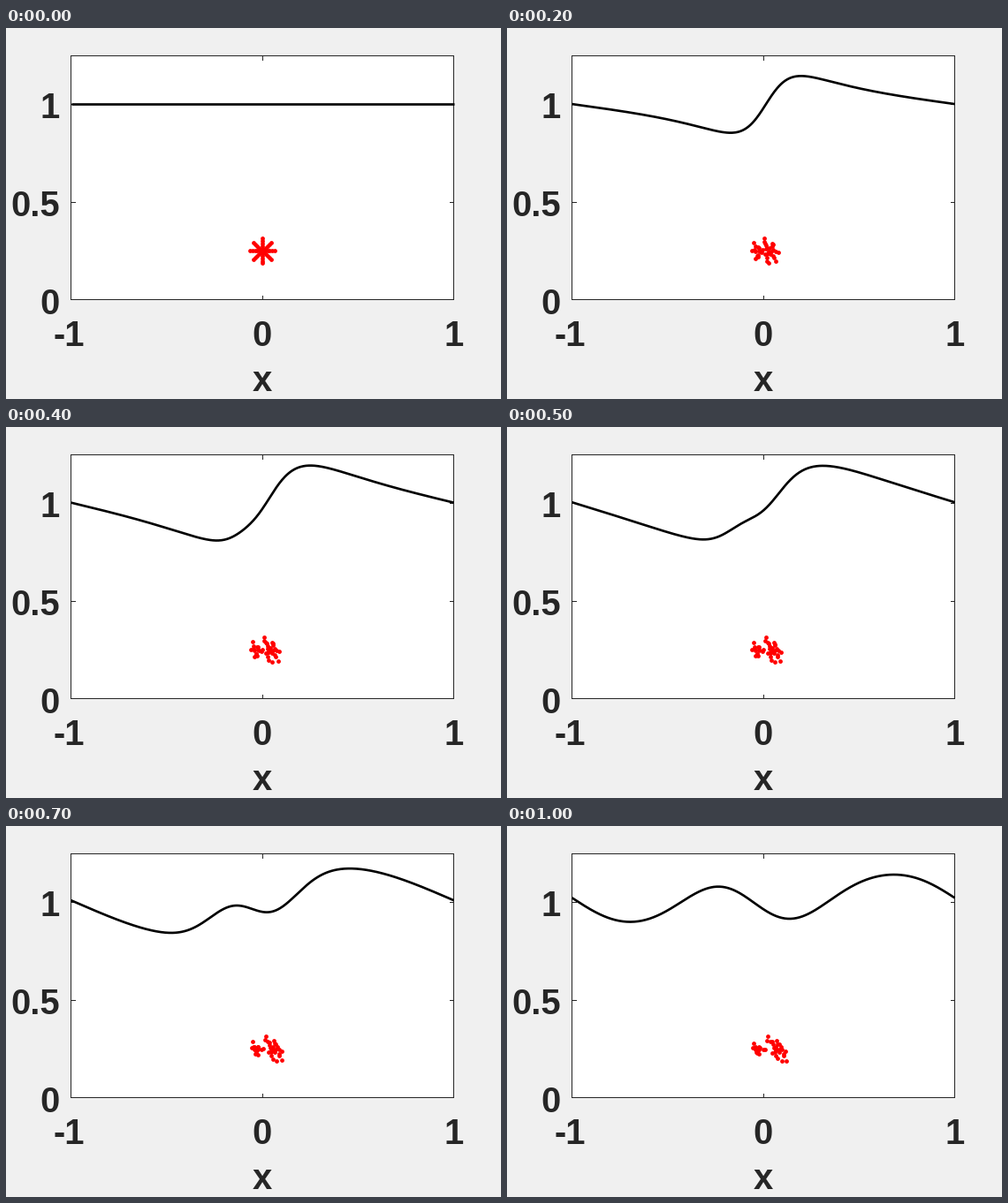
Recreate the animation shown at these times as a matplotlib script. Size 560x420 px, loop 1100 ms.

```python
import numpy as np
import matplotlib.pyplot as plt
from matplotlib.animation import FuncAnimation

W, H, DPI = 560, 420, 100
FRAMES, STEP = 11, 100
PX = 72 / DPI
INK = "#262626"
LEFT, RIGHT, TOP, BOTTOM = 73, 506, 31, 307
MID, HALF = 290, 216.5            # x = 0 and one unit of x, in pixels
LEVEL, UNIT = 86, 220.8           # y = 1 and one unit of y, in pixels
SPOKES, PER_SPOKE, REACH = 8, 5, 14


def smoothstep(s):
    s = np.clip(s, 0, 1)
    return s * s * (3 - 2 * s)


def surface(x, t):
    """Height above rest: a spreading periodic pair minus a later, narrower one."""
    # Outer trough and crest, at distance `reach` from the middle
    reach = 0.18 + 0.67 * 0.06 * np.logaddexp(0, (t - 0.33) / 0.06)
    height = 0.86 * t / (1 + (t / 0.45) ** 2.11)
    a, b = np.pi * (x - 0.013), np.pi * reach
    outer = height * np.sin(a) * np.sin(b) / (1 - np.cos(a) * np.cos(b))
    # Inner bump and dip, growing out of the middle
    u = (x + 0.048) / (0.02 + 0.215 * t ** 1.5)
    inner = 0.14 * smoothstep((t - 0.28) / 0.72) * u * np.exp((1 - u * u) / 2)
    return outer - inner + 0.015 * t ** 3


# Vortex cloud: an eight-armed star that scatters and splits in two
rng = np.random.default_rng(7)
angle = np.repeat(np.arange(SPOKES) * np.pi / 4, PER_SPOKE)
radius = np.tile(np.linspace(REACH / PER_SPOKE, REACH, PER_SPOKE), SPOKES)
home_x, home_y = radius * np.cos(angle), -radius * np.sin(angle)
left_side = np.cos(angle) < -0.5
drift = np.where(left_side, 2, 12 + 0.5 * home_y)
squeeze = np.where(left_side, 0.45, 0)
noise_x, noise_y = rng.normal(0, 2.2, (2, angle.size))


def cloud(t):
    x = home_x + drift * t ** 0.8 + noise_x * np.sqrt(t)
    y = home_y * (1 - squeeze * t) + noise_y * np.sqrt(t)
    return MID + np.clip(x, -REACH, 26), 252 + np.clip(y, -REACH, REACH)


fig = plt.figure(figsize=(W / DPI, H / DPI), dpi=DPI, facecolor="#f0f0f0")
ax = fig.add_axes([0, 0, 1, 1])
ax.set_xlim(0, W)
ax.set_ylim(H - 0.5, -0.5)
ax.axis("off")


def rule(x, y):
    ax.plot(x, y, color=INK, lw=PX, antialiased=False, solid_capstyle="butt", zorder=2)


def label(x, base, text):
    ax.text(x, base, text, ha="center", va="baseline", color=INK,
            family="Liberation Sans", weight="bold", size=40 * PX)


ax.fill([LEFT, RIGHT, RIGHT, LEFT], [TOP, TOP, BOTTOM, BOTTOM], color="white", lw=0, zorder=1)
rule([LEFT, RIGHT, RIGHT, LEFT, LEFT], [TOP, TOP, BOTTOM, BOTTOM, TOP])
for y in (86, 197):
    rule([LEFT, LEFT + 4.5], [y, y])
    rule([RIGHT - 4.5, RIGHT], [y, y])
rule([MID, MID], [TOP, TOP + 4.5])
rule([MID, MID], [BOTTOM - 4.5, BOTTOM])

for x, base, text in [(49.5, 102, "1"), (33.5, 213, "0.5"), (49.5, 324, "0"),
                      (71.5, 360, "-1"), (289.5, 360, "0"), (506.5, 360, "1"),
                      (289.5, 411, "x")]:
    label(x, base, text)

wave, = ax.plot([], [], color="black", lw=2.67 * PX, solid_capstyle="butt", zorder=3)
dots, = ax.plot([], [], "o", color="red", ms=4.8 * PX, mew=0, zorder=4)
grid = np.linspace(-1, 1, 400)


def draw(i):
    t = i * STEP / 1000
    wave.set_data(MID + HALF * grid, LEVEL - UNIT * surface(grid, t))
    dots.set_data(*cloud(t))
    return wave, dots


anim = FuncAnimation(fig, draw, frames=FRAMES, interval=STEP, repeat=True, repeat_delay=0)
plt.show()
```
